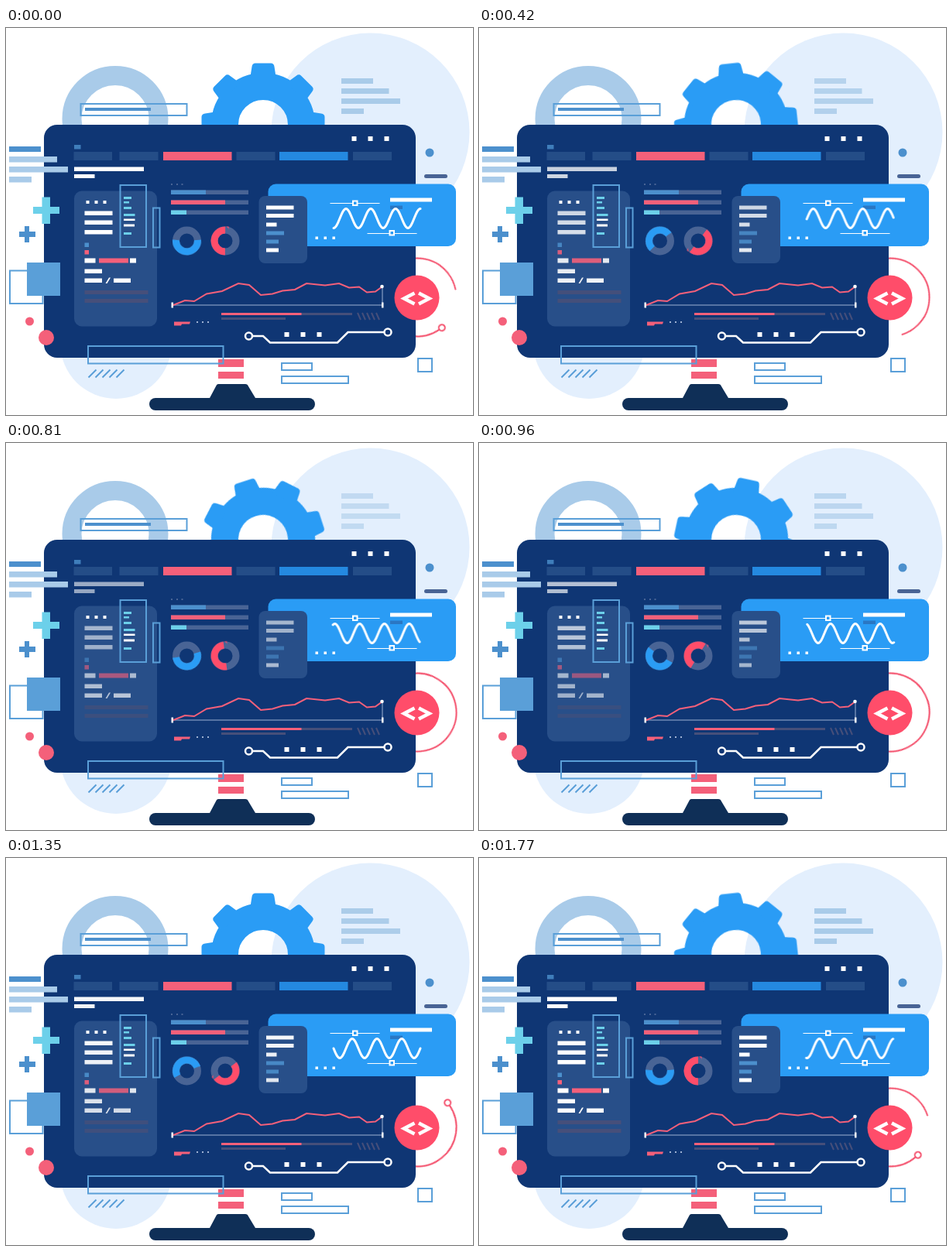
An HTML page without scripts for the animation above (1800 ms loop, 603 by 500 pixels).

```html
<!DOCTYPE html>
<html lang="en">
<head>
<meta charset="utf-8">
<title>Dashboard</title>
<style>
html, body { margin: 0; width: 100%; height: 100%; overflow: hidden; background: #fff; }
svg { display: block; width: 603px; height: 500px; }

.navy { fill: #0f3674; } .panel { fill: #284f89; } .tab { fill: #244d87; }
.sky { fill: #2a9cf5; } .blue { fill: #4c90cd; } .pale { fill: #a9cbe9; }
.mist { fill: #e3effd; } .pink { fill: #f4607a; } .teal { fill: #6cd0ea; }
.slate { fill: #496495; } .dusk { fill: #464f7a; } .white { fill: #fff; }
.line { fill: none; stroke: #5a9fd8; stroke-width: 2; }
.wire { fill: none; stroke: #fff; stroke-width: 2.5; }
.ring { fill: none; stroke-width: 9; }

.spin { animation: spin 1.8s steps(60) infinite; }
#gear { transform-origin: 332px 125px; }
#orbit { transform-origin: 531px 348px; }
@keyframes spin { to { transform: rotate(360deg); } }

#blueArc { transform-origin: 233.5px 275px; animation: blueTurn .9s linear infinite; }
#redArc { transform-origin: 283px 275px; animation: redTurn .9s linear infinite; }
@keyframes blueTurn {
  27% { transform: rotate(133deg); }
  47% { transform: rotate(140deg); }
  73% { transform: rotate(275deg); }
  93%, 100% { transform: rotate(360deg); }
}
@keyframes redTurn {
  50% { transform: rotate(232deg); }
  73% { transform: rotate(308deg); }
  93%, 100% { transform: rotate(360deg); }
}

#wave {
  fill: none; stroke: #fff; stroke-width: 3; stroke-linecap: round;
  stroke-dasharray: 35 60;
  animation: wave 1.8s steps(60) infinite;
}
@keyframes wave { to { transform: translateX(-32px); stroke-dashoffset: -10; } }

.dip > * { animation: dip 1.8s linear calc(var(--d, 0) * 30ms) infinite; }
.dip > :nth-child(2) { --d: 1; } .dip > :nth-child(3) { --d: 2; }
.dip > :nth-child(4) { --d: 3; } .dip > :nth-child(5) { --d: 4; }
.dip > :nth-child(6) { --d: 5; } .dip > :nth-child(7) { --d: 6; }
.dip > :nth-child(8) { --d: 6; } .dip > :nth-child(9) { --d: 7; }
.dip > :nth-child(n+10) { --d: 8; }
@keyframes dip {
  0%, 5% { opacity: 1; }
  42% { opacity: .55; }
  78%, 100% { opacity: 1; }
}
</style>
</head>
<body>
<svg viewBox="0 0 603 500" xmlns="http://www.w3.org/2000/svg">
  <defs>
    <path id="tooth" d="M315 66 317.5 50Q318 45.500 322 45.500H342Q346 45.500 346.500 50L349 66Z"/>
    <g id="pair"><use href="#tooth"/><use href="#tooth" transform="rotate(45 332 125)"/></g>
    <path id="dots" d="M0 0h6v6h-6zM21 0h6v6h-6zM42 0h6v6h-6z"/>
  </defs>

  <!-- backdrop -->
  <circle class="mist" cx="470.500" cy="134.500" r="128"/>
  <circle class="mist" cx="142" cy="407" r="72"/>
  <g class="pale dip">
    <path d="M433 65h41v7h-41z"/><path d="M433 78h61.500v7h-61.500z"/>
    <path d="M433 91h76v7h-76z"/><path d="M433 104h29v7h-29z"/>
  </g>
  <circle cx="141" cy="117.500" r="56" fill="none" stroke="#a9cbe9" stroke-width="25"/>
  <rect class="line" x="96.500" y="98" width="137" height="15"/>
  <path class="blue" d="M102 103h85v4h-85z"/>

  <g id="gear" class="spin sky">
    <circle cx="332" cy="125" r="49.500" fill="none" stroke="#2a9cf5" stroke-width="35"/>
    <use href="#pair"/>
    <use href="#pair" transform="rotate(90 332 125)"/>
    <use href="#pair" transform="rotate(180 332 125)"/>
    <use href="#pair" transform="rotate(270 332 125)"/>
  </g>

  <g id="orbit" class="spin" fill="none" stroke="#f4506c" stroke-width="2">
    <g transform="rotate(51 531 348)">
      <circle cx="531" cy="348" r="50.500" pathLength="360" stroke-dasharray="293 67" stroke-dashoffset="-5"/>
      <circle cx="581.500" cy="348" r="4"/>
    </g>
  </g>

  <!-- monitor -->
  <path class="pink" d="M274 428h33v10h-33zM274 444h33v9h-33z"/>
  <path fill="#0f2f57" d="M274 460h35q3 0 4 3l9 15h-59l8-15q1-3 3-3z"/>
  <rect x="185" y="478" width="214" height="16" rx="8" fill="#0f2f57"/>
  <rect class="navy" x="49" y="125" width="480" height="301" rx="17"/>
  <use href="#dots" class="white" x="446.500" y="140"/>
  <path class="blue" d="M88 151h8.500v5.500h-8.500z" opacity=".8"/>
  <path class="tab" d="M87.500 160h49.500v11h-49.500zM146.500 160h50v11h-50zM297.500 160h50v11h-50zM448 160h50v11h-50z"/>
  <path class="pink" d="M203 160h88.500v11h-88.500z"/>
  <path d="M353 160h88.500v11h-88.500z" fill="#2489e0"/>
  <g class="white dip">
    <path d="M88 179.500h90v5.500h-90z"/><path d="M88 189h26.500v5h-26.500z"/>
  </g>

  <!-- left panel -->
  <rect class="panel" x="88" y="210.500" width="107" height="175" rx="10"/>
  <path class="white" d="M103.500 223h4v4h-4zM114.500 223h4v4h-4zM125.500 223h4v4h-4z"/>
  <g class="white dip">
    <path d="M101.500 236.500h36v5.500h-36z"/>
    <path d="M101.500 248.500h36v5.500h-36z"/>
    <path d="M101.500 261h36v5.500h-36z"/>
    <path class="blue" d="M101.500 277.500h5.500v5.500h-5.500z"/>
    <path class="pink" d="M101.500 287h5.500v5.500h-5.500z"/>
    <path d="M101.500 297.500h14v6h-14zM160 297.500h8v6h-8z"/>
    <path class="pink" d="M120 297.500h38v6h-38z"/>
    <path d="M101.500 311.500h22.500v5.500h-22.500z"/>
    <path d="M101.500 323.500h22.500v5.500h-22.500zM128.500 330l4.500-7.500h2l-4.500 7.500z"/>
    <path d="M139 323.500h22v5.500h-22z"/>
    <path class="dusk" d="M101.500 339h82v5h-82z"/>
    <path class="dusk" d="M101.500 350h82v5h-82z"/>
  </g>
  <path class="teal" d="M152 218h10v3h-10zM152 224h7v2.500h-7zM152 231h10v3h-10zM152 240h14.500v3h-14.500zM152 264h10v3h-10z"/>
  <path class="white" d="M152 246.500h14.500v2.500h-14.500zM152 253.500h14v3h-14z"/>
  <path class="line" d="M147.500 203h33.500v80h-33.500zM190 232.500h8.500v51h-8.500z"/>

  <!-- progress -->
  <path class="slate" d="M213 201h2v2h-2zM220 201h2v2h-2zM226.500 201h2v2h-2zM213 209.500h100v5.500h-100zM213 222.500h100v5.500h-100zM213 235.500h100v5.500h-100z"/>
  <path class="blue" d="M213 209.500h45v5.500h-45z"/>
  <path class="pink" d="M213 222.500h70v5.500h-70z"/>
  <path class="teal" d="M213 235.500h20v5.500h-20z"/>

  <!-- donuts -->
  <g class="ring" stroke="#496495">
    <circle cx="233.500" cy="275" r="14"/><circle cx="283" cy="275" r="14"/>
  </g>
  <g id="blueArc"><circle class="ring" cx="233.500" cy="275" r="14" stroke="#2a9cf5"
    pathLength="360" stroke-dasharray="190 170" transform="rotate(-5 233.500 275)"/></g>
  <g id="redArc"><circle class="ring" cx="283" cy="275" r="14" stroke="#ff4d6a"
    pathLength="360" stroke-dasharray="180 180" transform="rotate(90 283 275)"/></g>

  <!-- chart -->
  <path d="M215 358H486V334" fill="none" stroke="#9fb2d3"/>
  <polyline points="216,358 231,352 243,353 259,343.500 279,340 300,330 314,332 329,345 344,343.500 357,339.500 373,338 388,330 412,332.500 430,330 443,335.500 456,334.500 466,341.500 477,340.500 486,334"
    fill="none" stroke="#f4607a" stroke-width="2"/>
  <path class="white" d="M213.500 354.500h2.500v7h-2.500zM485 354.500h2.500v7h-2.500z"/>
  <circle class="white" cx="485.500" cy="334" r="2.300"/>
  <path class="dusk" d="M278 368h169v3h-169zM278 374h83v3h-83z"/>
  <path class="pink" d="M278 368h103.500v3h-103.500zM217 379.500h21l-1 3h-10l-1 2h-9z"/>
  <path d="M454 368l4 9m2-9l4 9m2-9l4 9m2-9l4 9m2-9l4 9" fill="none" stroke="#464f7a" stroke-width="2"/>
  <path fill="#9fb2d3" d="M246 379h2v2h-2zM253 379h2v2h-2zM260 379h2v2h-2z"/>

  <!-- circuit -->
  <path class="wire" d="M318 398H332L341 406.500H428L441.500 393H488"/>
  <circle class="wire" cx="313.500" cy="398" r="4.500"/>
  <circle class="wire" cx="493" cy="393" r="4.500"/>
  <use href="#dots" class="white" x="359.500" y="393"/>

  <!-- wave window -->
  <rect class="sky" x="338.500" y="201.500" width="242.500" height="80.500" rx="10"/>
  <path d="M496 229.500h16v4.500h-16z" fill="#2a77c4"/>
  <path class="white" d="M496 219.500h54v5h-54zM399.500 269.500h3.500v3.500h-3.500zM410.500 269.500h3.500v3.500h-3.500zM421.500 269.500h3.500v3.500h-3.500z"/>
  <path d="M418.500 226.500h64M466.500 265.500h64" stroke="#fff"/>
  <path d="M448 223.500h5.500v5.500h-5.500zM495.500 262h5.500v5.500h-5.500z" fill="#2a9cf5" stroke="#fff" stroke-width="2"/>
  <path id="wave" pathLength="50" d="M423 258.500c6 0 10-25 16-25s10 25 16 25s10-25 16-25s10 25 16 25s10-25 16-25s10 25 16 25s10-25 16-25s10 25 16 25s10-25 16-25s10 25 16 25"/>

  <rect class="panel" x="326.500" y="217" width="62.500" height="87" rx="8"/>
  <g class="white dip">
    <path d="M336 229.500h35.500v5h-35.500z"/>
    <path d="M336 240h35.500v5h-35.500z"/>
    <path d="M336 251.500h13.500v5h-13.500z"/>
    <path class="blue" d="M336 262.500h23v5h-23z"/>
    <path class="blue" d="M336 273.500h16v5h-16z"/>
    <path d="M336 284.500h16v5h-16z"/>
  </g>

  <!-- code badge -->
  <circle cx="530.500" cy="348.500" r="29" fill="#ff4d6a"/>
  <path d="M527.500 342.500L514 349.500L527.500 356.500M533 342.500L546.500 349.500L533 356.500" fill="none" stroke="#fff" stroke-width="4.500"/>

  <!-- decorations -->
  <path class="blue" d="M4 153h41v7h-41z"/>
  <path class="pale" d="M4 166h62v7.500h-62zM4 179h76v7.500h-76zM4 192h29v7.500h-29z"/>
  <path class="teal" d="M46.500 218.500h10.500v12.500h12v9h-12v13h-10.500v-13h-11.500v-9h11.500z"/>
  <path class="blue" d="M24 256h6v7h8v7h-8v7h-6v-7h-7v-7h7z"/>
  <rect class="line" x="5" y="313.500" width="42.500" height="42.500"/>
  <path d="M27 303h43v43h-43z" fill="#5a9fd8"/>
  <circle class="pink" cx="30.500" cy="379" r="5.500"/>
  <circle class="pink" cx="52" cy="400" r="10"/>
  <path class="line" d="M106 411h174.500v22.500h-174.500zM356 433h39v9h-39zM356 450h86v9h-86zM532 427h18v17h-18z"/>
  <path class="line" d="M106.500 451.500l10-10m-1 10l10-10m-1 10l10-10m-1 10l10-10m-1 10l10-10"/>
  <circle class="blue" cx="547" cy="161" r="5.500"/>
  <rect class="slate" x="540" y="189" width="30" height="5" rx="2.500"/>
</svg>
</body>
</html>
```
